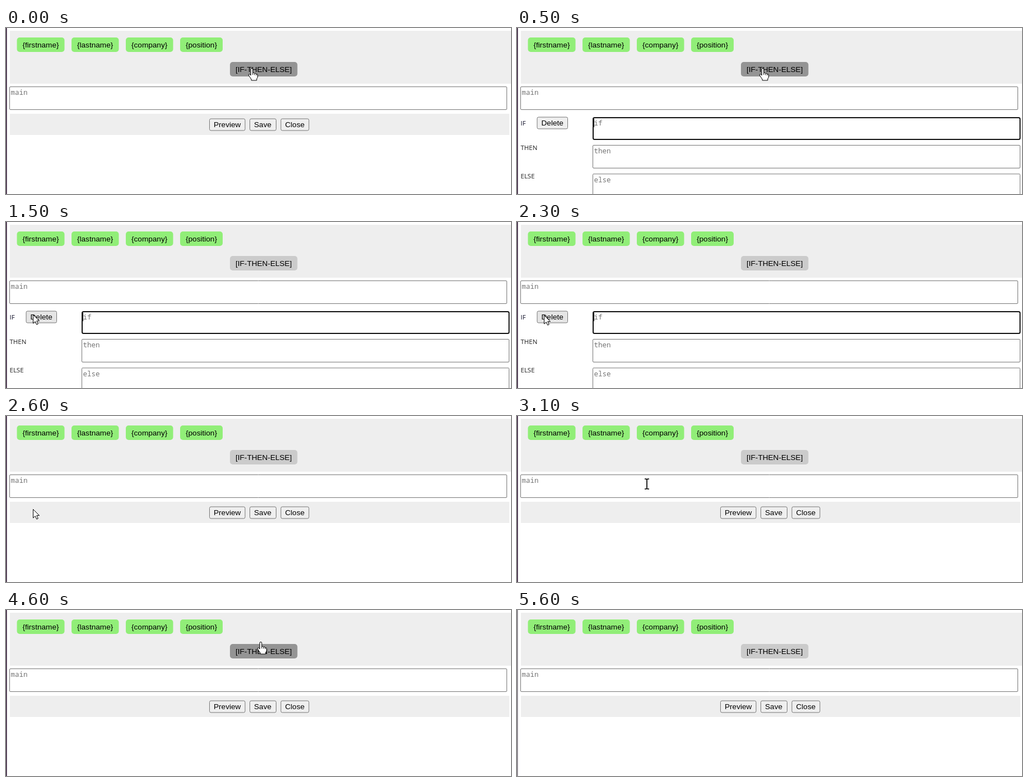
An HTML page with a canvas that plays this animation: 902 px wide and 298 px high, repeating every 5700 ms.

```html
<!DOCTYPE html>
<html lang="en">
<head>
<meta charset="utf-8">
<title>Template editor</title>
<style>
  html, body { margin: 0; width: 100%; height: 100%; overflow: hidden; background: #fff; }
  canvas { display: block; }
</style>
</head>
<body>
<canvas id="stage" width="902" height="298"></canvas>
<script>
const ctx = document.getElementById('stage').getContext('2d');
const LOOP = 5700, STEP = 100;
const FORM_OPEN = 200, FORM_CLOSED = 2500, POINTER_GONE = 4800, EDGE_FADE = 5600;

const SANS = '13.6px "Liberation Sans", Arial, sans-serif';
const MONO = '12.5px "Noto Sans Mono", monospace';
const LABEL = '11.5px "Open Sans", sans-serif';

// time, x, y of the pointer's hot spot
const pointerPath = [
  [0, 439, 72], [600, 439, 72], [1000, 78, 143], [1200, 51, 164], [1500, 48, 166],
  [2800, 48, 167], [3400, 416, 77], [3500, 417, 77], [4500, 417, 77],
  [4600, 455, 57], [4700, 612, 40]
];

const arrow = new Path2D('M.5 .5V16L4.2 12.6L6.8 18.2L9.3 17L6.8 11.6H11.5Z');
const hand = new Path2D('M-1.8 2Q-1.8 .4 0 .4T1.8 2V8.5Q4.5 7.5 5 9.5Q7.5 8.5 8 10.5' +
  'Q10.5 10 10.5 13V16Q10 18 8.8 19V22H-.8V20Q-3 17 -5.5 13Q-6.5 11 -4.5 10.8Q-3 11 -1.8 13Z');
const beam = new Path2D('M-4 -9H-1.5L0 -8L1.5 -9H4M0 -8V8M-4 9H-1.5L0 8L1.5 9H4');

function box(x, y, w, h, fill, radius = 0, stroke, line = 1) {
  ctx.beginPath();
  ctx.roundRect(x, y, w, h, radius);
  ctx.fillStyle = fill;
  ctx.fill();
  if (!stroke) return;
  ctx.strokeStyle = stroke;
  ctx.lineWidth = line;
  ctx.stroke();
}

function text(string, x, y, font = SANS, color = '#000') {
  ctx.font = font;
  ctx.fillStyle = color;
  ctx.fillText(string, x, y);
}

function tag(string, x, y, w, fill) {
  box(x, y, w, 26, fill, 5);
  text(string, x + 10, y + 18);
}

function button(string, x, y, w, fill = '#efefef') {
  box(x + .5, y + .5, w - 1, 21, fill, 2.5, '#767676');
  text(string, x + 8, y + 15.5);
}

function textarea(placeholder, x, y, w, focused) {
  if (focused) box(x + 1, y, w - 1, 39, '#fff', 2.5, '#101010', 2);
  else box(x + .5, y + .5, w - 1, 41, '#fff', 1.5, '#767676');
  text(placeholder, x + 2.5, y + (focused ? 13.5 : 15), MONO, '#757575');
}

function pointerAt(time) {
  const next = pointerPath.findIndex(key => key[0] > time);
  if (next < 0) return pointerPath.at(-1).slice(1);
  const [t0, x0, y0] = pointerPath[next - 1], [t1, x1, y1] = pointerPath[next];
  const k = (time - t0) / (t1 - t0);
  return [x0 + (x1 - x0) * k, y0 + (y1 - y0) * k];
}

function drawPointer(x, y, overButton) {
  const overText = y > 105 && y < 147;
  const shape = overButton ? hand : overText ? beam : arrow;
  ctx.save();
  ctx.translate(Math.round(x), Math.round(y));
  ctx.lineJoin = 'round';
  ctx.strokeStyle = '#000';
  ctx.lineWidth = overText ? 1.7 : 1;
  if (!overText) {
    ctx.fillStyle = '#fff';
    ctx.fill(shape);
  }
  ctx.stroke(shape);
  if (overButton) ctx.stroke(new Path2D('M1.8 8.5V12M5 9.5V12.5M8 10.5V13'));
  ctx.restore();
}

function drawForm(time, overDelete) {
  text('IF', 6.5, 174.5, LABEL, '#14142c');
  button('Delete', 35.5, 159.5, 55.5, overDelete ? '#e5e5e5' : '#efefef');
  textarea('if', 135, 161, 763.5, true);
  text('THEN', 6.5, 218.5, LABEL, '#222');
  textarea('then', 135, 210, 764);
  text('ELSE', 6.5, 269.5, LABEL, '#222');
  textarea('else', 135, 261.5, 764);
  const caretOn = (time - FORM_OPEN) % 1000 < 500;
  if (caretOn) box(137, 163, 1, 15, '#000');
}

function drawFooter() {
  box(7, 154, 892, 38, '#eee');
  button('Preview', 363, 162.5, 64.5);
  button('Save', 435, 162.5, 48);
  button('Close', 490.5, 162.5, 51);
}

function draw(time) {
  const visible = time < POINTER_GONE;
  const [x, y] = pointerAt(time);
  const overButton = visible && x > 400 && x < 520 && y > 55 && y < 87;
  const overDelete = x > 36 && x < 91 && y > 160 && y < 182;

  box(0, 0, 902, 298, '#fff');
  box(0, 0, 1.5, 298, time < EDGE_FADE ? '#260d2b' : '#77707a');
  box(7, 5, 895, 95, '#eee');
  const green = '#91ee78';
  tag('{firstname}', 19.5, 17, 85, green);
  tag('{lastname}', 117, 17, 84.5, green);
  tag('{company}', 214, 17, 84.5, green);
  tag('{position}', 311, 17, 76, green);
  tag('[IF-THEN-ELSE]', 400, 61, 120.5, overButton ? '#949494' : '#cbcbcb');
  textarea('main', 6, 105, 889);

  if (time >= FORM_OPEN && time < FORM_CLOSED) drawForm(time, overDelete);
  else drawFooter();
  if (visible) drawPointer(x, y, overButton);
}

const start = performance.now();
function tick() {
  const elapsed = (performance.now() - start) % LOOP;
  draw(Math.floor(elapsed / STEP) * STEP);
  requestAnimationFrame(tick);
}
tick();
</script>
</body>
</html>
```
